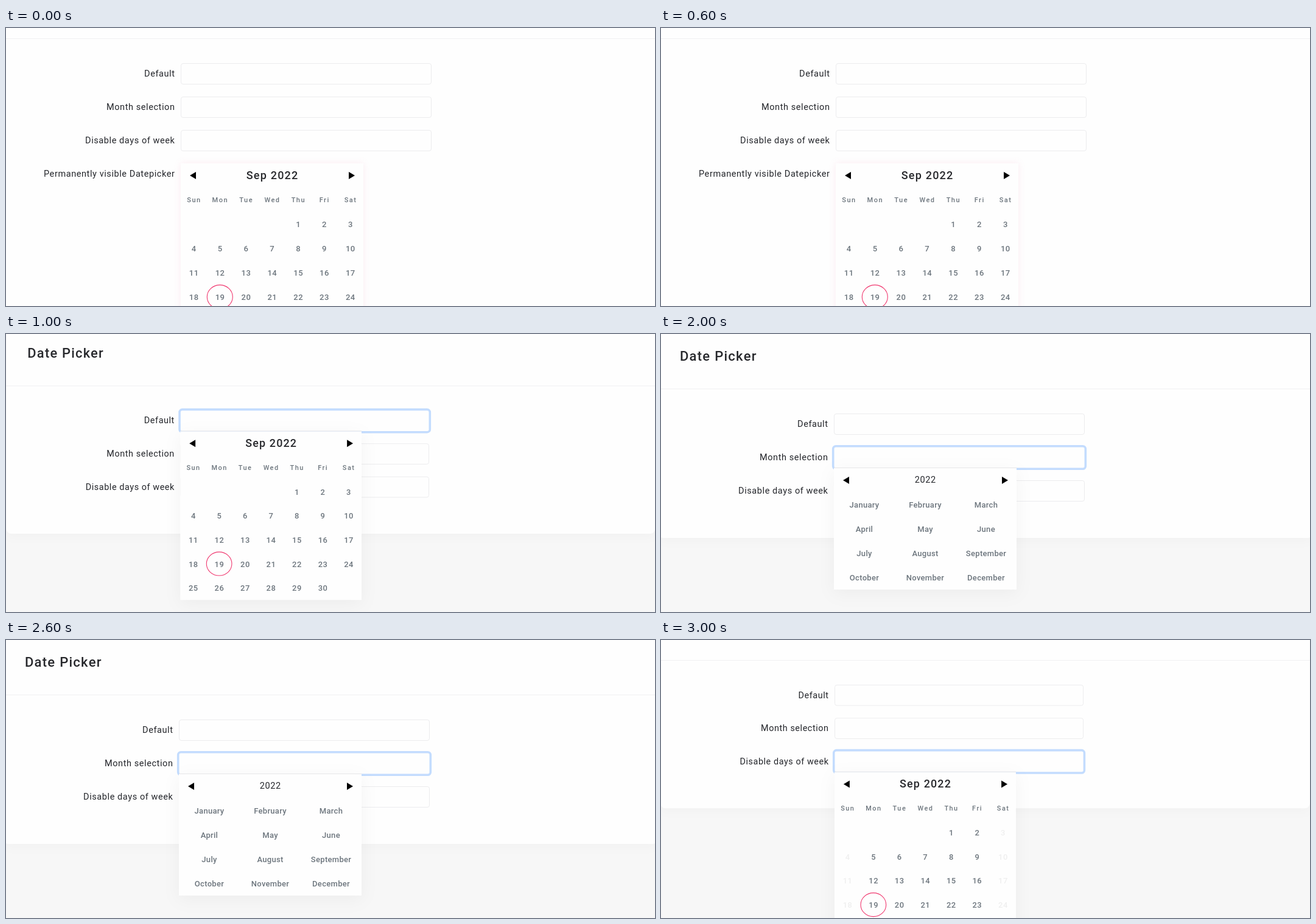
An HTML page for the animation above (4 s loop, 1066 by 458 pixels).

```html
<!DOCTYPE html>
<html lang="en">
<head>
<meta charset="utf-8">
<title>Date Picker</title>
<style>
  html, body { margin: 0; width: 100%; height: 100%; overflow: hidden; background: #f7f7f7; }
  svg { display: block; width: 1066px; height: 458px; font-family: Roboto, sans-serif; }
  .card { fill: #fefefe; filter: drop-shadow(0 6px 8px rgba(0, 0, 0, .02)); }
  .popup { fill: #fefefe; filter: drop-shadow(0 6px 14px rgba(0, 0, 0, .045)); }
  .inline { fill: #fefefe; filter: drop-shadow(0 0 6px rgba(225, 70, 130, .1)); }
  .field { fill: #fefefe; stroke: #ececee; }
  .focus { fill: #fefefe; stroke: #c3dcfe; stroke-width: 3.6; }
  .label { font-size: 14.5px; letter-spacing: .58px; fill: #24262b; text-anchor: end; }
  .title { font-size: 22px; font-weight: 500; letter-spacing: 1.25px; fill: #27282c; }
  .month, .year, .week, .day, .name { text-anchor: middle; }
  .month { font-size: 18px; font-weight: 500; letter-spacing: 1.2px; fill: #27282c; }
  .year { font-size: 14.5px; letter-spacing: .6px; fill: #24262b; }
  .week { font-size: 11px; font-weight: 500; letter-spacing: 1.5px; fill: #6c757d; }
  .day { font-size: 13px; font-weight: 500; letter-spacing: .5px; fill: #6c757d; }
  .name { font-size: 13px; font-weight: 500; letter-spacing: .3px; fill: #6c757d; }
  .off { fill: #efefef; }
  .today { fill: none; stroke: #f0386f; stroke-width: 1.1; }
</style>
</head>
<body>
<svg id="stage" viewBox="0 0 1066 458"></svg>
<script>
const LEFT = 284, WIDTH = 300, ROW = 55;
const LABELS = ['Default', 'Month selection', 'Disable days of week', 'Permanently visible Datepicker'];
const WEEK = ['Sun', 'Mon', 'Tue', 'Wed', 'Thu', 'Fri', 'Sat'];
const MONTHS = ['January', 'February', 'March', 'April', 'May', 'June', 'July',
  'August', 'September', 'October', 'November', 'December'];

const text = (cls, x, y, s) => `<text class="${cls}" x="${x}" y="${y}">${s}</text>`;
const rect = (cls, x, y, w, h, r = 0) =>
  `<rect class="${cls}" x="${x}" y="${y}" width="${w}" height="${h}" rx="${r}"/>`;
const hline = (x, y, w, color) => `<path d="M${x} ${y}h${w}" stroke="${color}"/>`;

function panel(top, height, inline) {
  const y = top + 20;
  return rect(inline ? 'inline' : 'popup', LEFT, top, WIDTH, height) +
    (inline ? '' : hline(LEFT, top - .5, WIDTH, '#e6e6e8')) +
    `<path d="M${LEFT + 15} ${y}l10 -6v12zM${LEFT + 286} ${y}l-10 -6v12z"/>`;
}

function calendar(top, { inline = false, weekdaysOnly = false }) {
  const cell = WIDTH / 7, center = col => LEFT + cell * (col + .5);
  let out = panel(top, 280, inline) + text('month', LEFT + 150.6, top + 26, 'Sep 2022');
  WEEK.forEach((name, col) => out += text('week', center(col) + .5, top + 64, name));
  for (let day = 1; day <= 30; day++) {
    const slot = day + 3, col = slot % 7, y = top + 100 + 40 * Math.floor(slot / 7);
    const off = weekdaysOnly && col % 6 === 0;
    out += text(off ? 'day off' : 'day', center(col) + .3, y + 5, day);
    if (day === 19)
      out += `<ellipse class="today" cx="${center(col)}" cy="${y}" rx="21" ry="19.6"/>`;
  }
  return out;
}

function monthList(top) {
  return panel(top, 200) + text('year', LEFT + 150.3, top + 24, '2022') +
    MONTHS.map((name, i) =>
      text('name', LEFT + 50 + i % 3 * 100, top + 65 + 40 * Math.floor(i / 3), name)).join('');
}

function page({ x, y, scale = 1, focus = -1, rows = 3, popup }) {
  let out = rect('card', -4, -20, 1074, rows === 3 ? 356 : 700, 8) +
    hline(-10, 90.5, 1090, '#f0f0f2') + text('title', 31, 44, 'Date Picker');
  for (let i = 0; i < rows; i++) {
    const top = 131 + ROW * i;
    out += text('label', 274.5, top + 22, LABELS[i]);
    if (i === 3) continue;
    out += i === focus
      ? rect('focus', LEFT - 1.3, top - 1.3, 414.6, 37.6, 4.5)
      : rect('field', LEFT + .5, top + .5, 411, 34, 3.5);
  }
  return `<g transform="translate(${x} ${y}) scale(${scale})">${out}${popup}</g>`;
}

const stage = document.getElementById('stage');
stage.innerHTML = [
  { x: 3, y: -73, rows: 4, popup: calendar(296, { inline: true }) },
  { x: 4.6, y: -4.3, scale: .992, focus: 0, popup: calendar(166, {}) },
  { x: 0, y: 0, focus: 1, popup: monthList(221) },
  { x: 3, y: -56.4, scale: .993, focus: 2, popup: calendar(276, { weekdaysOnly: true }) }
].map(page).join('');
const pages = [...stage.children];

function draw() {
  const current = Math.floor(performance.now() / 1000) % pages.length;
  pages.forEach((g, i) => g.style.display = i === current ? '' : 'none');
  requestAnimationFrame(draw);
}
draw();
</script>
</body>
</html>
```
